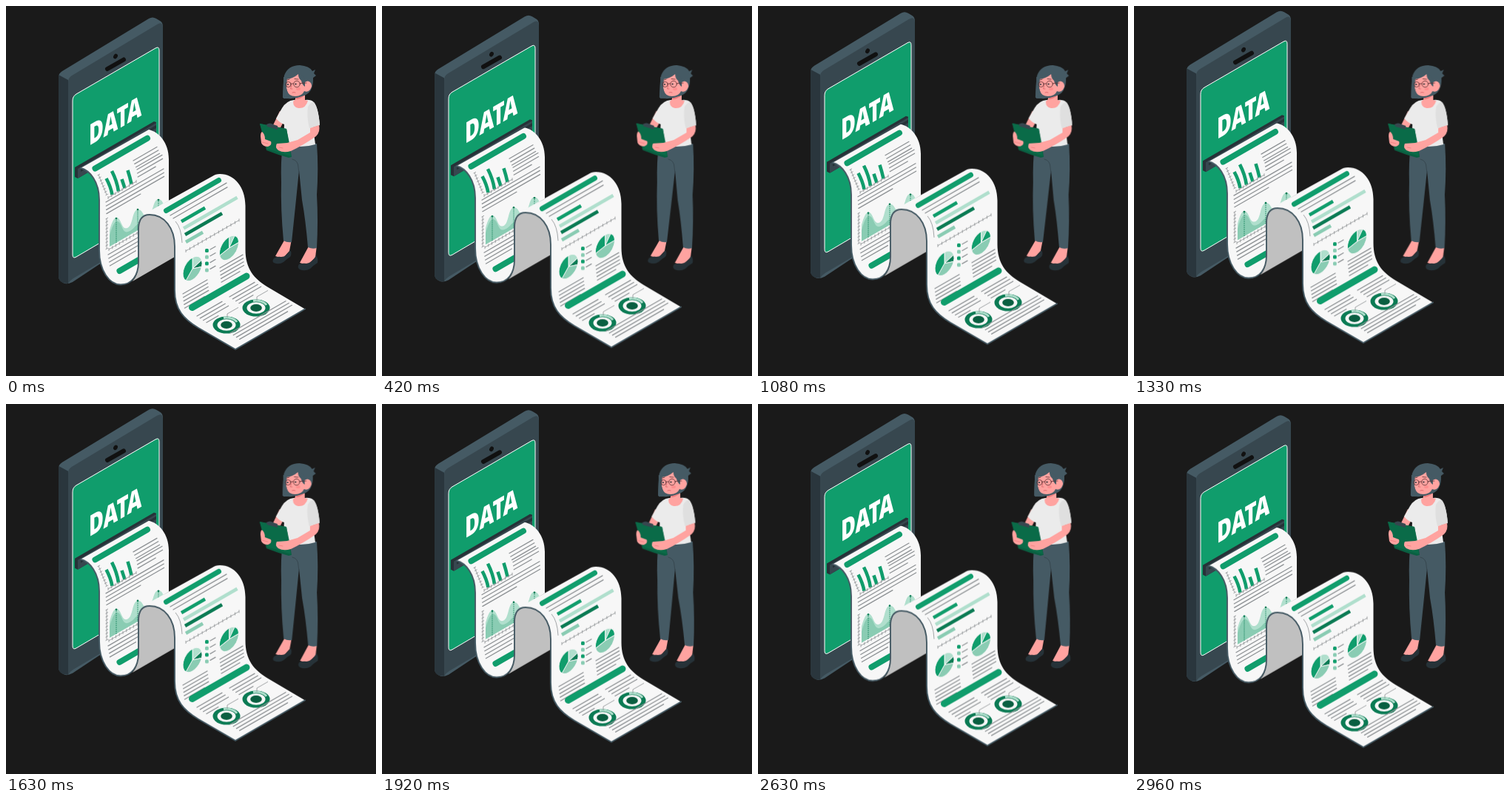
These frames come from a looping animation (500x500 px, 3000 ms). An HTML page:

```html
<!DOCTYPE html>
<html lang="en">
<head>
<meta charset="utf-8">
<title>Data report</title>
<style>
html, body { margin: 0; width: 100%; height: 100%; overflow: hidden; background: #1a1a1a; }
svg { display: block; width: 100vw; height: 100vh; }
.float { animation: float 3s linear infinite; }
.sway { animation: sway 3s linear infinite; transform-origin: 391.5px 218px; }
@keyframes float { 50% { transform: translateY(-10px); } }
@keyframes sway { 25% { transform: rotate(1deg); } 75% { transform: rotate(-1deg); } }
.title { font: 800 39px "Open Sans", "Noto Sans", sans-serif; fill: #fff; }
.dark { fill: #263238; }
.slate { fill: #455a64; }
.steel { fill: #37474f; }
.skin { fill: #ffa3a0; }
.line { fill: none; stroke-linecap: round; stroke-linejoin: round; }
.text { stroke: #8d9194; stroke-width: 1.25; }
.pill { stroke: #109d6c; stroke-width: 8; }
.axis { fill: none; stroke: #8d9194; stroke-width: .8; }
</style>
</head>
<body>
<svg viewBox="0 0 500 500">
  <defs>
    <clipPath id="front">
      <path d="M101 219 193 167C206 170 220 184 220 207V263L186 283Q179 289 179 302V346C179 364 170 376.500 155 376.500C140 376.500 126 358 126 330V262C126 237 113 222 101 219Z"/>
    </clipPath>
  </defs>

  <g class="float">
    <g id="phone">
      <path class="slate" d="M71 96Q71 91 76 88L193 17Q198 14 203 17L208 20Q212 22 212 28V292L90 373Q82 377 77 374Q71 371 71 365Z"/>
      <path class="steel" d="M84 103Q84 97 89 94L204 25Q212 20 212 30V290Q212 296 207 299L91 368Q86 371 84 375Z"/>
      <path fill="#2a363d" d="M71 93 84 100V375Q71 375 71 365Z"/>
      <path fill="#109d6c" stroke="#fff" stroke-width="1" d="M90 128Q90 122 95 119L202 57Q207 54 207 60V268Q207 273 202 276L95 339Q90 342 90 336Z"/>
      <ellipse cx="148" cy="68" rx="2.700" ry="3.500" fill="#111" transform="rotate(30 148 68)"/>
      <path class="line" d="M137 85 159 72.500" stroke="#111" stroke-width="6"/>
      <text class="title" transform="matrix(.7 -.404 0 1 112 189)">DATA</text>
      <path class="dark" d="M93 218 200 156 203 157V171L97 233 93 231Z"/>
      <path class="steel" d="M97 220 203 158V170L97 233Z"/>
      <path class="dark" d="M101 220 203 161V165L101 224Z"/>
    </g>

    <g clip-path="url(#front)">
      <path fill="#f7f7f7" d="M90 150H240V390H90Z"/>
      <g id="sheetA"></g>
    </g>

    <path fill="#c0c0c0" d="M171 372Q179 364 179 346V302C179 288 185 282 194 282C214 282 228 300 228 325V339Z"/>
    <path fill="#f7f7f7" d="M184 285Q188 280 196 276L279 230Q283 227 289 227C309 227 323.500 245 323.500 270V329C323.500 355 335 368.500 354 380L404 409.500 310 464 260 435C240 423 228 410 228 384V325C228 300 214 282 194 282Q188 282 184 285Z"/>
    <path class="line" stroke="#455a64" stroke-width="1.900" d="M101 219C113 222 126 237 126 262V330C126 358 140 376.500 155 376.500C170 376.500 179 364 179 346V302C179 288 185 282 194 282C214 282 228 300 228 325V384C228 410 240 423 260 435L310 464 404 409.500"/>
    <g id="sheetB"></g>
  </g>

  <g class="sway">
    <g id="feet">
      <path class="skin" d="M377 315H386L383 331 374 341 364 338Z"/>
      <path class="dark" d="M362 341Q367 338 371 339Q378 340 384 330Q387 334 384 339Q379 342 375 346Q369 350 362 347Q359 345 362 341Z"/>
      <path class="skin" d="M410 323H420L418 340 407 350 397 347Z"/>
      <path class="dark" d="M396 349Q401 347 406 348Q414 347 419 337Q422 341 421 347Q416 350 411 355Q404 359 397 356Q393 353 396 349Z"/>
    </g>
    <path class="slate" d="M374 186H420Q422.500 220 420 255Q422 290 420 327Q414 329 408 326Q405 290 400 262L396 222Q391 272 386 319Q380 320 375 317Q371 274 372 238Q371 211 374 186Z"/>
    <path class="line" stroke="#37474f" stroke-width="1" d="M387 207Q395 209 395 218L396 226"/>
    <path class="skin" d="M370 142 379 149 370 166 358 172 360 163Z"/>
    <path fill="#ebebeb" d="M389 127Q379 128 373 138L365 152Q370 158 376 160L375 187Q399 193 418 187L415 164 424 161Q422 137 416 130Q412 126 404 127Z"/>
    <path fill="#dfdfdf" d="M408 136Q412 129 416 130Q422 137 424 161L410 165Q406 150 408 136Z"/>
    <path class="skin" d="M391 116H404V127L408 128Q405 139 395 138Q388 137 388 129L391 126Z"/>
    <path fill="#ed7c7d" d="M392 121Q399 121 403 115V121Q398 126 392 126Z"/>

    <g id="head">
      <path class="slate" d="M374 124Q374 107 376 94Q381 80 397 80Q410 81 414 88L418 86 416 91 419 94 415 97Q416 118 400 122Q388 127 374 124Z"/>
      <path class="skin" d="M379 99Q388 98 395 92Q398 99 404 103Q408 100 411 103Q415 107 411 113Q408 117 403 115Q400 122 391 122Q382 122 380 115L378 107Z"/>
      <path class="slate" d="M395 92Q400 93 404 98L404 109Q400 106 399 101Q395 98 395 92Z"/>
      <path class="slate" d="M375 96 380 96 379 111Q380 117 384 121L381 125H375Z"/>
      <g class="line" stroke="#5a3034" stroke-width=".8">
        <circle cx="381.500" cy="106" r="3.600"/>
        <circle cx="393" cy="105.500" r="4.300"/>
        <path d="M385 105 388.500 105M397.500 104.500 406 104M380 100 383 99M390 98.500 395 99"/>
        <path stroke="#d66267" d="M386 107 384.500 112 387 112M387 117Q389 116 391 117"/>
      </g>
      <g class="dark"><circle cx="381" cy="106" r="1"/><circle cx="391.500" cy="105.500" r="1.100"/></g>
      <ellipse cx="395" cy="112" rx="3" ry="2" fill="#ff8f8f"/>
    </g>

    <g id="board">
      <path fill="#0a5f41" d="M343 159 379 166Q383 184 386 204L382 205Q367 201 352 195Z"/>
      <path fill="#0a6b48" d="M343 159 379 166 385 203 353 193Z"/>
      <path class="steel" d="M352 160Q357 157 361 160L367 162 367 167 353 163Z"/>
      <path class="skin" d="M346 170Q350 173 350 180L358 183Q360 188 354 190Q347 190 345 185L344 176Q344 171 346 170Z"/>
      <path class="skin" d="M411 165 423 161Q425 170 419 176Q402 188 385 196Q375 199 368 195Q363 191 366 186L380 185 394 181 411 171Z"/>
      <path class="line" stroke="#ed7c7d" stroke-width=".8" d="M346 184 354 186M369 191 374 192"/>
    </g>
  </g>
</svg>

<script>
const GREEN = '#109d6c', DEEP = '#0b7b54', PALE = '#b0dfcd', MINT = '#8accb3';
const SLOPE = -0.577;
const sheetA = document.getElementById('sheetA'), sheetB = document.getElementById('sheetB');

function add(parent, name, attrs) {
  const el = document.createElementNS('http://www.w3.org/2000/svg', name);
  for (const key in attrs) el.setAttribute(key, attrs[key]);
  parent.append(el);
}
const path = (parent, d, attrs) => add(parent, 'path', { d, ...attrs });
const rise = (x, y, w) => `M${x} ${y}l${w} ${w * SLOPE}`;

// Rows of text: dx, dy step to the next row; the last row may be shorter
function rows(parent, x, y, w, n, dx, dy, last = w) {
  for (let i = 0; i < n; i++)
    path(parent, rise(x + i * dx, y + i * dy, i < n - 1 ? w : last), { class: 'line text' });
}
function pill(parent, x, y, w, size = 8) {
  path(parent, rise(x, y, w), { class: 'line pill', style: `stroke-width:${size}` });
}
function bar(parent, d, stroke) {
  path(parent, d, { fill: 'none', stroke, 'stroke-width': 4.6 });
}
function ticks(parent, x, y, w, n) {
  let d = rise(x, y, w);
  for (let i = 0; i <= n; i++) d += `M${x + w * i / n} ${y + w * i / n * SLOPE - 2}v4`;
  path(parent, d, { class: 'axis' });
}
function sideTicks(parent, x, y, dx, dy, n) {
  let d = `M${x} ${y}l${dx} ${dy}`;
  for (let i = 0; i <= n; i++) d += `M${x - 1.5 + dx * i / n} ${y + 1 + dy * i / n}l3.500 -2`;
  path(parent, d, { class: 'axis' });
}

// Each slice is [end of turn, colour]; the first one starts at the top
function pie(cx, cy, slices) {
  const at = t => `${15 * Math.sin(t * 2 * Math.PI)} ${-15 * Math.cos(t * 2 * Math.PI)}`;
  let from = 0;
  for (const [to, fill] of slices) {
    path(sheetB, `M0 0L${at(from)}A15 15 0 0 1 ${at(to)}Z`, {
      fill, stroke: '#f7f7f7', 'stroke-width': 1,
      transform: `matrix(.866 -.5 0 1 ${cx} ${cy})`
    });
    from = to;
  }
}
function donut(cx, cy) {
  const oval = (rx, ry, fill) => add(sheetB, 'ellipse', { cx, cy, rx, ry, fill });
  oval(18.5, 11.5, DEEP);
  oval(12.5, 7.8, '#f7f7f7');
  oval(7.8, 5, '#0a5f41');
  path(sheetB, `M${cx - 4} ${cy - 9.6}A15.500 9.600 0 0 1 ${cx + 14} ${cy - 4}`,
    { fill: 'none', stroke: PALE, 'stroke-width': 3 });
  path(sheetB, `M${cx + 1} ${cy - 10}v-5l15 -8.600`, { class: 'axis' });
}

// Upper sheet
pill(sheetA, 120.5, 219.5, 70.5);
sideTicks(sheetA, 125, 228, 11, 27, 7);
[[135.5, 233, 143.5, 255], [143, 223, 152, 250.5], [156.5, 234, 160.5, 246], [164.5, 222, 169.5, 240.5]]
  .forEach(([x, y, u, v]) => bar(sheetA, `M${x} ${y}Q${u - 2} ${(y + v) / 2} ${u} ${v}`, GREEN));
ticks(sheetA, 138, 259, 38, 8);
rows(sheetA, 172, 209, 32, 3, 1.8, 4.4);
rows(sheetA, 177, 221, 34, 3, .6, 5, 24);
rows(sheetA, 135, 265, 78, 4, .3, 5.2, 46);
sideTicks(sheetA, 136, 287, 0, 41, 9);
path(sheetA, 'M140 325V303C143 292 146 285 150 286C156 287 156 303 164 300C172 297 170 276 178 275C186 274 184 287 192 283C200 279 198 262 206 261C211 261 213 268 216 275V281Z', { fill: PALE });
path(sheetA, 'M140 325V310C144 296 147 290 151 291C157 293 157 308 165 305C174 302 173 296 181 294C187 292 187 289 193 284L216 271V281Z', { fill: MINT });
path(sheetA, 'M149 286V320M178 275V303M206 261V287', { fill: 'none', stroke: DEEP, 'stroke-width': .9, 'stroke-dasharray': '1.5 1.2' });
for (const [cx, cy] of [[149, 287], [178, 275], [206, 262]]) add(sheetA, 'circle', { cx, cy, r: 1.3, fill: DEEP });
ticks(sheetA, 139, 329, 76, 16);
rows(sheetA, 138, 336, 46, 4, .8, 5, 35);
pill(sheetA, 153.5, 358, 32);

// Lower sheet
pill(sheetB, 216.5, 276.5, 71, 7);
rows(sheetB, 222, 283, 76, 2, 4, 4, 73);
path(sheetB, 'M229 291Q237 300 238 320', { class: 'axis' });
bar(sheetB, rise(237, 291.3, 32), GREEN);
bar(sheetB, rise(240, 300.5, 72.5), PALE);
bar(sheetB, rise(242, 309, 50), DEEP);
bar(sheetB, rise(243, 319, 23), MINT);
ticks(sheetB, 243, 331, 72, 13);
pie(252, 355, [[.2, PALE], [.3, DEEP], [.62, MINT], [1, GREEN]]);
pie(301.5, 327, [[.1, PALE], [.25, GREEN], [.72, MINT], [1, GREEN]]);
for (let i = 0; i < 4; i++) {
  const y = 330 + i * 8.8;
  add(sheetB, 'rect', { x: 269, y: y - 2, width: 4.8, height: 5, rx: 1.5, fill: i % 2 ? MINT : GREEN });
  path(sheetB, rise(276, y - 1, 7), { class: 'line text' });
}
rows(sheetB, 239, 389, 33, 5, .6, 4.8, 27);
rows(sheetB, 289, 354, 31, 5, .5, 4.8, 25);
pill(sheetB, 251.5, 407.5, 73.5, 9);
rows(sheetB, 258, 419, 34, 4, 4.3, 2.9, 16);
rows(sheetB, 302, 393, 34, 4, 4.3, 2.9, 19);
donut(298, 431);
donut(338, 408);
rows(sheetB, 303, 442, 75, 4, 4.2, 2.8, 65);
</script>
</body>
</html>
```
